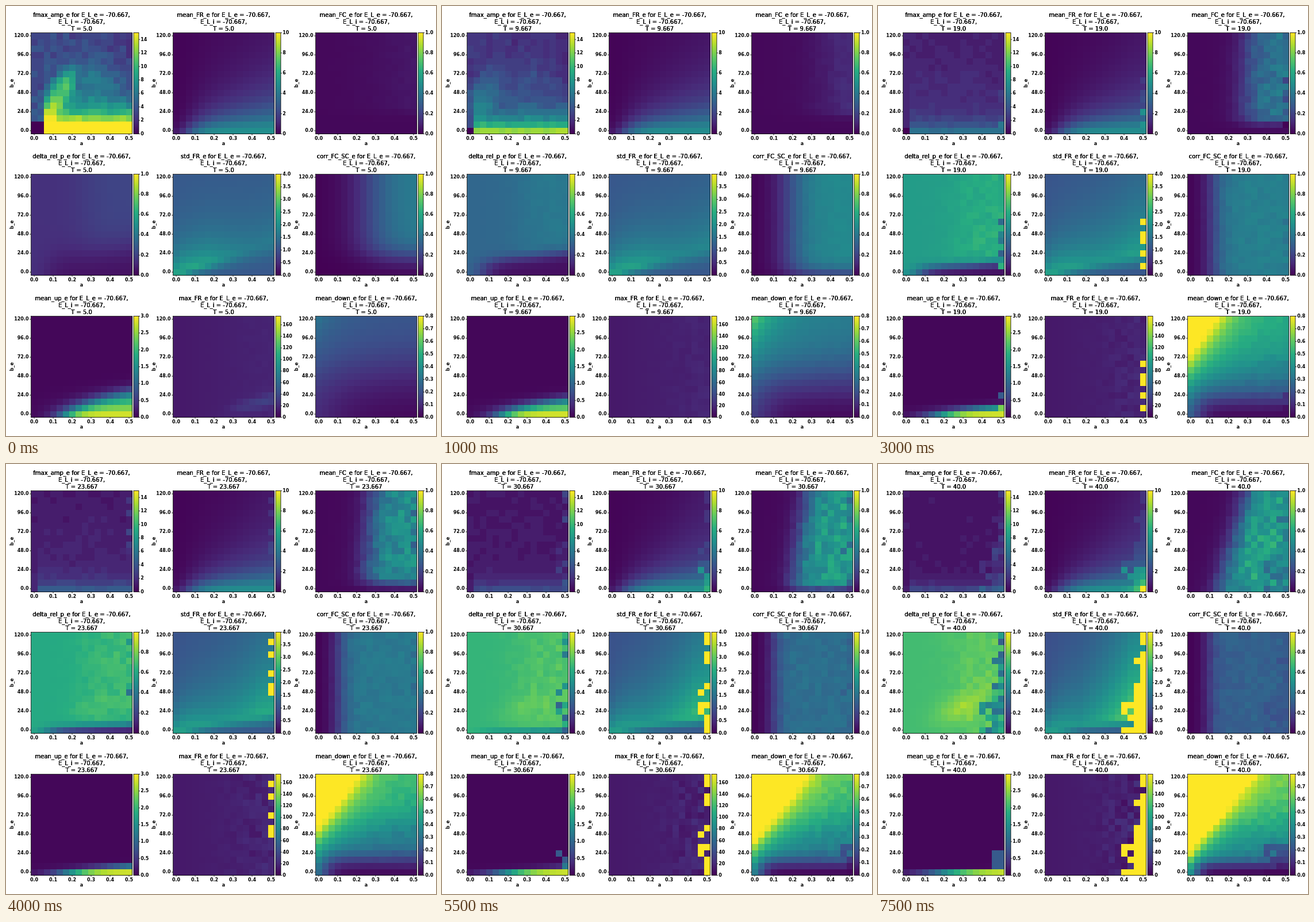
An HTML page with a canvas that plays this animation: 748 by 748 pixels, repeating every 8000 ms.

```html
<!DOCTYPE html>
<html lang="en">
<head>
<meta charset="utf-8">
<title>Parameter sweep</title>
<style>
  html, body { margin: 0; width: 100%; height: 100%; overflow: hidden; background: #fff; }
  canvas { display: block; width: 748px; height: 748px; }
</style>
</head>
<body>
<canvas id="stage" width="748" height="748"></canvas>
<script>
const ctx = document.getElementById('stage').getContext('2d');
const N = 16, STEP_MS = 500, SIZE = 176, CELL = SIZE / N;
const VIRIDIS = ['#440154', '#472c7a', '#3b518b', '#2c718e', '#21908d',
  '#27ad81', '#5cc863', '#aadc32', '#fde725'];

const { exp, max, min, round, floor } = Math;
const clamp = x => max(0, min(1, x));
const mix = (a, b, t) => a + (b - a) * t;
const sig = x => 1 / (1 + exp(-x));
// Settles from a to b over the steps
const fade = (s, a, b, tau) => b + (a - b) * exp(-s / tau);

// Seeded noise in -0.5..0.5
function noise(i, j, s, k) {
  const x = Math.sin(i * 12.9898 + j * 78.233 + s * 37.719 + k * 11.137) * 43758.5453;
  return x - floor(x) - 0.5;
}

// Outliers eat in from the right edge, deepest in the lower rows
function isOutlier(i, j, s) {
  if (s < 6) return false;
  const depth = ((s - 5) / 10) ** 2 * (1.1 + 2 * sig((6.5 - j) * 1.5));
  return 15.5 - i < depth + 1.6 * noise(i, j, s, 9);
}

// Fields: column i, row j from the bottom, step s, outlier flag, noise n(k)
function peakFreq(i, j, s, out, n) {
  if (i + j === 0 && s < 7 || s === 0 && i < 2 && j < 2) return 0;
  const top = fade(s, 3.4, 0.8, 4) - 0.06 * i * exp(-s / 3);
  const low = fade(s, 22, 2.9, 3);
  const fall = exp(-j / (2.8 - 0.12 * s));
  const left = i < (s < 2 ? 2 : 1) ? 0.12 : 1;
  const dx = (i - fade(s, 4, 2, 1) - (j - 6) * 0.4) / (1.9 + 0.4 * s);
  const dy = (j - 6) / 4;
  const plume = 5.5 * exp(-s / 2) * exp(-((dx * dx + dy * dy) ** 2));
  const patch = 2 * exp(-s / 4) * exp(-((i - 9.5) ** 2 + (j - 8) ** 2) / 14);
  const v = top + (low - top) * fall * left + plume + patch
    + n(1) * fade(s, 1.6, 0.3, 3) + (out ? 1.2 + 2 * n(2) : 0);
  return round(v / 0.4) * 0.4;
}

function meanRate(i, j, s, out) {
  const amp = 0.6 + fade(s, 4.2, 3.7, 5) * (1 - exp(-((i / 3) ** 1.6)));
  const width = 0.9 + i * fade(s, 0.21, 0.13, 4);
  const v = 0.1 + amp / (1 + (j / width) ** 1.6) + s / 25 * sig((i - 6 - 0.4 * j) / 2);
  if (!out) return v;
  return j < 4 ? 5 + (s / 15) ** 4 * 5 * exp(-(j + 15 - i)) : v + 0.6;
}

function meanFC(i, j, s, out, n) {
  const onset = fade(s, 13.5, 6, 6) + (j - 7) * 0.3 * (s / 15) ** 2;
  const rise = sig((i - onset) / fade(s, 4, 1, 2.5));
  const bottom = sig((j - 3 + 0.26 * s) * 2.3);
  const level = 0.05 + 0.5 * sig((s - 5) / 1.8);
  return 0.02 + rise * (bottom * level * (1 + 0.35 * n(1)) - (out ? 0.12 : 0));
}

function relDelta(i, j, s, out, n) {
  if (out) return 0.5 + 0.4 * n(2);
  const right = sig((i - 8) / 1.6);
  const streak = 0.12 * (s / 15) ** 2
    * exp(-((i - 8.5) ** 2) / 16 - (j - 3.5 - (i - 8.5) * 0.3) ** 2 / 5);
  const v = fade(s, 0.14, 0.715, 4.8) + streak + right * (0.07 + n(1) * min(0.08, 0.012 * s));
  const edge = 3 - 0.32 * s + (i - 8) * 0.15 * exp(-s / 8);
  return mix(v, 0.04, sig(i - 2) * sig((edge - j) / fade(s, 1.4, 0.4, 1)));
}

function stdRate(i, j, s, out) {
  if (out) return 4;
  const ridge = i * fade(s, 0.34, 0.18, 5);
  const amp = mix(1.45 - 0.06 * i, 0.55 + 0.105 * s, clamp((i - 5) / 8)) - 0.25 * exp(-i);
  const reach = 4 + i * (0.15 + 0.04 * s);
  const shape = j >= ridge ? exp(-(j - ridge) / reach)
    : exp(-(((ridge - j) / (0.8 + 0.35 * ridge)) ** 2));
  return 1.1 - 0.01 * s + amp * shape;
}

function corrFC(i, j, s, out, n) {
  const rise = sig((i - fade(s, 8, 2.8, 3.2)) / fade(s, 2.2, 0.75, 4));
  const bottom = sig((j - fade(s, 2.6, -3, 3)) / fade(s, 1.1, 0.7, 1));
  const level = 0.51 - 0.013 * s - 0.08 * exp(-s);
  return rise * bottom * (level + n(1) * fade(s, 0, 0.06, 5) - (out ? 0.04 : 0));
}

function meanUp(i, j, s, out) {
  const q = j * (1 + 0.2 * s + 0.01 * s * s);
  const middle = 5 + 1.2 * q + 0.35 * q * q + (j ? 0 : 0.08 * s);
  const soft = 1.2 + 0.085 * s + 0.3 * q;
  const v = 0.05 + 2.75 * max(0, 1 - 0.14 * q) * sig((i - middle) / soft);
  return out && i > 13 && j > 0 && j < 4 ? v + 0.8 : v;
}

function maxRate(i, j, s, out, n) {
  if (out) return 175;
  const patch = 16 * exp(-1.5 * s) * exp(-((j - 1.6 - (i - 12) * 0.25) ** 2)) * sig(i - 9.5);
  return 12 + 0.4 * i + patch + n(1) * (2 + 1.3 * s) * sig((i - 9.5) / 1.5);
}

function meanDown(i, j, s, out, n) {
  const plain = fade(s, 0.14, 0.38, 8)
    + fade(s, 0.08, 0.3, 6) * sig((j - 6 - 0.15 * i) / 2);
  // A diagonal front moves in from the upper left corner
  const g = ((j - fade(s, 18, 1.5, 6)) * 0.7 - i) / (3.5 - 0.1 * s);
  const front = (0.15 + 0.0135 * s) * (g > 0 ? 1 + g : exp(g));
  const dark = sig((i - 1) / fade(s, 3, 0.7, 3))
    * sig((fade(s, 5, 1.2, 5) - j) / fade(s, 3, 0.5, 4));
  const rough = min(0.06, 0.006 * s) * sig((i - 8) / 1.5) * n(1);
  return (plain + front + rough) * (1 - dark) * (out && j < 5 ? 0.6 : 1);
}

// [title, scale maximum, tick step, tick decimals, field]
const PANELS = [
  ['fmax_amp_e', 15, 2, 0, peakFreq], ['mean_FR_e', 10, 2, 0, meanRate], ['mean_FC_e', 1, 0.2, 1, meanFC],
  ['delta_rel_p_e', 1, 0.2, 1, relDelta], ['std_FR_e', 4, 0.5, 1, stdRate], ['corr_FC_SC_e', 1, 0.2, 1, corrFC],
  ['mean_up_e', 3, 0.5, 1, meanUp], ['max_FR_e', 175, 20, 0, maxRate], ['mean_down_e', 0.8, 0.1, 1, meanDown]
];

const RGB = VIRIDIS.map(hex => [1, 3, 5].map(k => parseInt(hex.slice(k, k + 2), 16)));

function color(v) {
  const x = clamp(v) * 8, k = min(7, floor(x));
  return `rgb(${RGB[k].map((c, m) => round(mix(c, RGB[k + 1][m], x - k)))})`;
}

function text(str, x, y, align) {
  ctx.textAlign = align;
  ctx.fillText(str, x, y);
}

function line(x1, y1, x2, y2) {
  ctx.beginPath();
  ctx.moveTo(x1, y1);
  ctx.lineTo(x2, y2);
  ctx.stroke();
}

function drawTitle(name, s, x, y) {
  const T = (5 + s * 7 / 3).toFixed(s % 3 ? 3 : 1);
  const rows = [`${name} for E_L_e = -70.667,`, 'E_L_i = -70.667,', `T = ${T}`];
  ctx.font = '10px "DejaVu Sans", sans-serif';
  ctx.textBaseline = 'alphabetic';
  // Overprinted for a heavier look
  for (let pass = 0; pass < 3; pass++) {
    rows.forEach((row, k) => text(row, x, y - 27.5 + k * 12, 'center'));
  }
}

function drawCells(field, top, s, x, y) {
  for (let j = 0; j < N; j++) for (let i = 0; i < N; i++) {
    const v = field(i, j, s, isOutlier(i, j, s), k => noise(i, j, s, k));
    ctx.fillStyle = color(v / top);
    ctx.fillRect(round(x + i * CELL), round(y + SIZE - (j + 1) * CELL), CELL, CELL);
  }
}

function drawAxes(x, y) {
  ctx.strokeRect(x, y, SIZE, SIZE);
  ctx.font = 'bold 8px "DejaVu Sans", sans-serif';
  ctx.textBaseline = 'middle';
  for (let k = 0; k < 6; k++) {
    const d = (3 * k + 0.5) * CELL;
    line(x + d, y + SIZE, x + d, y + SIZE + 2.5);
    line(x, y + SIZE - d, x - 2.5, y + SIZE - d);
    text((k / 10).toFixed(1), x + d, y + SIZE + 8, 'center');
    text((k * 24).toFixed(1), x - 4, y + SIZE - d + 0.3, 'right');
  }
  text('a', x + SIZE / 2, y + SIZE + 17.5, 'center');
  ctx.save();
  ctx.translate(x - 32.5, y + SIZE / 2);
  ctx.rotate(-Math.PI / 2);
  text('b_e', 0, 0, 'center');
  ctx.restore();
}

function drawBar(top, step, digits, x, y) {
  const ramp = ctx.createLinearGradient(0, y + SIZE, 0, y);
  VIRIDIS.forEach((c, k) => ramp.addColorStop(k / 8, c));
  ctx.fillStyle = ramp;
  ctx.fillRect(x, y, 9, SIZE);
  ctx.strokeRect(x, y, 9, SIZE);
  ctx.fillStyle = '#000';
  for (let k = 0; k * step <= top + 1e-6; k++) {
    const ty = y + SIZE * (1 - k * step / top);
    line(x + 9, ty, x + 11, ty);
    text((k * step).toFixed(digits), x + 12.2, ty + 0.3, 'left');
  }
}

function draw(s) {
  ctx.fillStyle = '#fff';
  ctx.fillRect(0, 0, 748, 748);
  ctx.strokeStyle = '#000';
  ctx.lineWidth = 0.8;
  PANELS.forEach(([name, top, step, digits, field], k) => {
    const x = floor(43.5 + (k % 3) * 247.3) + 0.5;
    const y = floor(46.2 + floor(k / 3) * 246.4) + 0.5;
    drawCells(field, top, s, x, y);
    ctx.fillStyle = '#000';
    drawTitle(name, s, x + SIZE / 2, y);
    drawAxes(x, y);
    drawBar(top, step, digits, x + 178.5, y);
  });
}

let shown = -1;
const start = performance.now();
function tick() {
  const s = floor((performance.now() - start) / STEP_MS) % N;
  if (s !== shown) draw(shown = s);
  requestAnimationFrame(tick);
}
tick();
</script>
</body>
</html>
```
